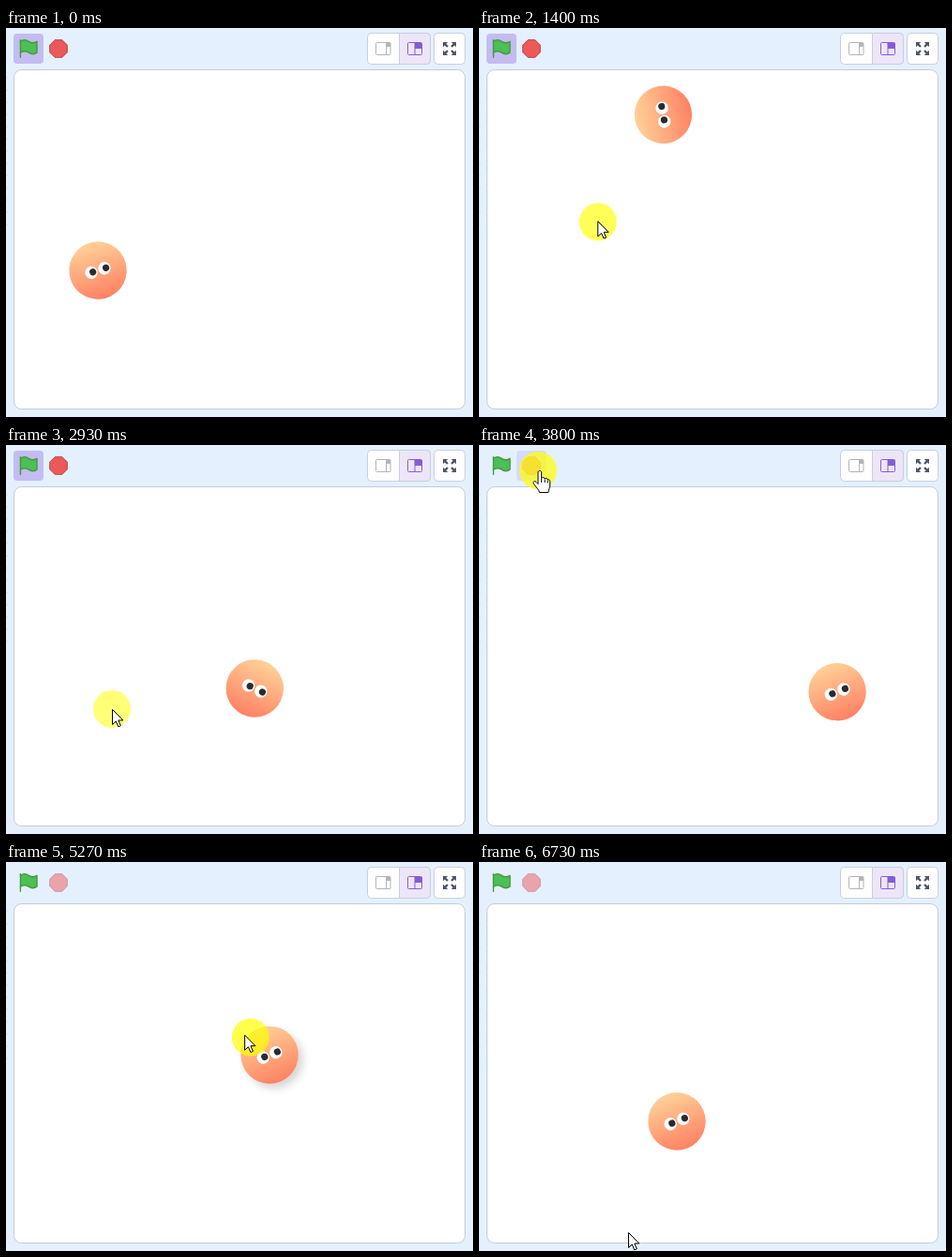
These frames come from a looping animation (498 by 414 pixels, 6.8 s). An HTML page:

```html
<!DOCTYPE html>
<html lang="en">
<head>
<meta charset="utf-8">
<title>Wandering ball</title>
<style>
html, body { margin: 0; width: 100%; height: 100%; overflow: hidden; background: #e5f0ff; }
svg { display: block; }
</style>
</head>
<body>
<svg width="498" height="414" viewBox="0 0 498 414">
  <defs>
    <linearGradient id="skin" x1="0" y1="0" x2="0" y2="1">
      <stop offset="0" stop-color="#ffd199"/>
      <stop offset="1" stop-color="#ff8163"/>
    </linearGradient>
    <g id="eye">
      <circle r="6.7" fill="#fff"/>
      <circle cx="1.7" r="3.6" fill="#2b2b2b"/>
    </g>
    <path id="corner" d="M-7-7h5.2L-3.6-5.2-1.2-2.8-2.8-1.2-5.2-3.6-7-1.8Z"/>
  </defs>

  <path d="M1 52.5V222" stroke="#d6e0ec" stroke-width="2" stroke-dasharray="1 12"/>

  <!-- run and stop buttons -->
  <rect id="runBack" x="8" y="6" width="32" height="32" rx="4" fill="#855cd6" opacity=".35"/>
  <rect id="stopBack" x="40" y="6" width="32" height="32" rx="4" fill="#855cd6" opacity=".15"/>
  <g fill="#4cbf56" stroke="#45993d" stroke-width="1.4" stroke-linecap="round" stroke-linejoin="round">
    <path d="M15.4 14.3q4.4-3 8.8 0t8.8 0V26.2q-4.4 3-8.8 0t-8.8 0"/>
    <path d="M15.4 12.8V31.2"/>
  </g>
  <path id="stop" d="M52.1 12.7H59.9L65.3 18.1V25.9L59.9 31.3H52.1L46.7 25.9V18.1Z" fill="#ec5959" stroke="#b84848"/>

  <!-- view buttons -->
  <g stroke="#c7cfdd">
    <rect x="385.5" y="5.5" width="67" height="33" rx="4" fill="#fff"/>
    <path d="M419.5 5.5H448.5a4 4 0 0 1 4 4V34.5a4 4 0 0 1-4 4H419.5Z" fill="#ede6f8"/>
    <rect x="456.5" y="5.5" width="33" height="33" rx="4" fill="#fff"/>
  </g>
  <g fill="none" stroke="#b3b4ba">
    <rect x="394.5" y="15.5" width="15.5" height="13" rx="1"/>
    <path d="M405.5 16V28"/>
    <path d="M406 16h4v4h-4Z" fill="#b3b4ba" stroke="none"/>
  </g>
  <g fill="none" stroke="#855cd6">
    <rect x="428.5" y="15.5" width="15" height="13" rx="1"/>
    <path d="M436 16V28"/>
    <path d="M436 16h7.5v6h-7.5Z" fill="#855cd6" stroke="none"/>
  </g>
  <g transform="translate(473 22)" fill="#4d556d">
    <use href="#corner"/>
    <use href="#corner" transform="rotate(90)"/>
    <use href="#corner" transform="rotate(180)"/>
    <use href="#corner" transform="rotate(270)"/>
  </g>

  <rect x="8.5" y="44.5" width="481" height="361" rx="8" fill="#fff" stroke="#c2ccd9"/>

  <g id="lift">
    <g id="ball">
      <circle r="30.7" fill="url(#skin)"/>
      <use href="#eye" x="-7.3"/>
      <use href="#eye" x="7.3"/>
    </g>
  </g>
  <circle id="halo" r="20" fill="#ff0"/>
  <g id="cursor" fill="#fff" stroke="#000" stroke-linejoin="round">
    <path id="arrow" d="M.5.5V16.5L4.3 13 6.8 18.8 9.3 17.7 6.8 12H11.8Z"/>
    <path id="hand" d="M0 2C0 0 3.6 0 3.6 2V8.500C4.500 7 7 7.500 7.200 9 8.500 8 10 8.500 10.300 10 11.500 9.300 12.700 10.200 12.700 11.500V16C12.700 18.500 11.300 20 11 23.500H1.500C1.200 21-2 18-4.500 14.500-6 12-3.500 10.500-2 12.500L0 14.500ZM3.600 8.500V13M7.200 9.500V13M10.300 10.500V13.500"/>
  </g>
</svg>
<script>
const LOOP = 6800, STEP = LOOP / 102;
const STOPPED = 3733, GRABBED = 4343, RELEASED = 6600;
const DRAG_LAG = 52, HALO_LAG = 10;
const RADIAN = Math.PI / 180;
const part = id => document.getElementById(id);

// The roaming ball turns left at a steady rate, so it travels on circles;
// bouncing off the top edge starts a second one.
const TURN = 0.059, TURN_RADIUS = 146;
const outward = { start: 0, x: 98, y: 258, heading: -18 };
const bounced = { start: 1533, x: 189, y: 82, heading: 108 };

// time, x, y, halo opacity
const mouseKeys = [
  [800, 203, 340, 0], [1450, 125, 203, .67], [2000, 139.5, 224, .67],
  [2933, 113, 281, .53], [3600, 63, 27, .7], [3850, 63, 27, .7], [4290, 387, 261, .7]
];

// time, centre x, centre y, radius of the swirl in which the ball is dragged
const swirlKeys = [
  [4343, 382, 261, 0], [4515, 375, 273, 0], [4800, 255, 278, 30],
  [5267, 237, 249, 62], [5500, 225, 222, 58], [6250, 230, 257, 40], [6590, 211, 276, 0]
];
const SWIRL_PERIOD = 600, SWIRL_START = 5192;

const linear = u => u;
const smooth = u => u * u * (3 - 2 * u);

function glide(keys, t, ease) {
  const next = keys.findIndex(k => k[0] > t);
  if (next < 1) return keys.at(next).slice(1);
  const a = keys[next - 1], b = keys[next], u = ease((t - a[0]) / (b[0] - a[0]));
  return a.map((value, i) => value + (b[i] - value) * u).slice(1);
}

function roam(t) {
  const leg = t < 1500 ? outward : bounced;
  const heading = leg.heading - TURN * (Math.min(t, STOPPED) - leg.start);
  const from = leg.heading * RADIAN, to = heading * RADIAN;
  return [
    leg.x + TURN_RADIUS * (Math.sin(from) - Math.sin(to)),
    leg.y + TURN_RADIUS * (Math.cos(to) - Math.cos(from)),
    heading
  ];
}

function drag(t) {
  const [x, y, radius] = glide(swirlKeys, t, linear);
  const angle = (t - SWIRL_START) / SWIRL_PERIOD * 2 * Math.PI;
  return [x + radius * Math.cos(angle), y - radius * Math.sin(angle), -22];
}

// The mouse runs slightly ahead of the ball it drags
function mouseAt(t) {
  if (t > 6700) return [159, 394, 0];
  if (t < 4300) return glide(mouseKeys, t, smooth);
  const [x, y] = drag(t + DRAG_LAG);
  return [x + 5, y, .7];
}

const show = (id, visible) => part(id).style.display = visible ? "" : "none";
const move = (id, x, y, angle = 0) =>
  part(id).setAttribute("transform", `translate(${x} ${y}) rotate(${angle})`);

function draw(t) {
  const running = t < STOPPED - 10;
  move("ball", ...(t < GRABBED ? roam(t) : drag(t)));
  part("lift").style.filter = t > GRABBED && t < RELEASED
    ? "drop-shadow(5px 5px 4px rgba(0,0,0,.16))" : "none";

  const [x, y, glow] = mouseAt(t);
  const overStop = x > 40 && x < 72 && y > 6 && y < 38;
  move("cursor", x, y);
  move("halo", ...mouseAt(t - HALO_LAG).slice(0, 2));
  part("halo").setAttribute("opacity", glow);
  show("cursor", t > 790);
  show("arrow", !overStop);
  show("hand", overStop);
  show("stopBack", overStop);
  show("runBack", running);
  part("stop").setAttribute("opacity", running ? 1 : .5);
}

function tick() {
  const frame = Math.floor(performance.now() % LOOP / STEP + .1);
  draw(frame % 102 * STEP);
  requestAnimationFrame(tick);
}
tick();
</script>
</body>
</html>
```
